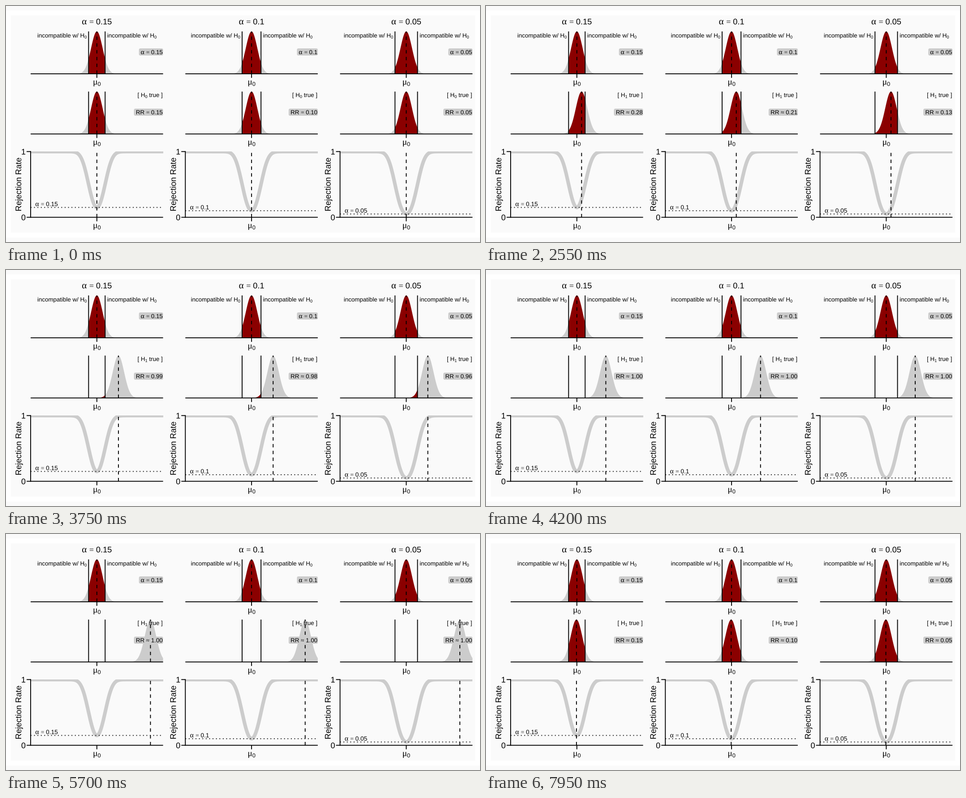
A matplotlib script that plays this animation: 1058x529 px, repeating every 8000 ms.

```python
import math

import matplotlib.pyplot as plt
import numpy as np
from matplotlib.animation import FuncAnimation
from matplotlib.collections import LineCollection
from matplotlib.patches import FancyBboxPatch, PathPatch, Rectangle
from matplotlib.path import Path
from matplotlib.textpath import TextPath
from matplotlib.transforms import Affine2D

W, H, DPI = 1058, 529, 100
PT = 72 / DPI
FRAMES, STEP_MS = 160, 50
CYCLE, HOLD = 130, 20           # frames per sweep, frames resting on the null

PANEL_DX = 345.3
LEFT, MID, RIGHT = 55, 202.8, 350.6
SIGMA = 12.82
TOP_BASE, LOW_BASE, PEAK = 152, 286.8, 95
RATE_ZERO, RATE_ONE = 473.6, 326.3
LINE = 1.9
SOLID, DASHED, DOTTED = "-", (0, (4, 4)), (0, (1, 3))
SMALL, BIG = 13.33, 18.2
GREY, RED, PAPER = "#cccccc", "#8b0000", "#fafafa"
LEVELS = [(0.15, 1.43953), (0.10, 1.64485), (0.05, 1.95996)]

# advance in em and size factor of the symbol glyphs
SYMBOLS = {"α": (0.631, 1.15), "μ": (0.576, 1.08), "=": (0.549, 1), "≈": (0.549, 1)}

fig = plt.figure(figsize=(W / DPI, H / DPI), dpi=DPI, facecolor=PAPER)
ax = fig.add_axes([0, 0, 1, 1])
ax.set_xlim(0, W)
ax.set_ylim(H, 0)
ax.axis("off")

glyph_cache, label_cache = {}, {}
static_text = []
static_lines = {SOLID: [], DASHED: [], DOTTED: []}


def glyphs(text, size, family="Liberation Sans"):
    key = text, size, family
    if key not in glyph_cache:
        path = TextPath((0, 0), text, size=size, prop={"family": family})
        glyph_cache[key] = Path(path.vertices, path.codes)
    return glyph_cache[key]


def advance(text, size):
    def reach(s):
        return glyphs(s, size).vertices[:, 0].max()
    return reach(text + "|") - reach("|")


def label_path(parts, size):
    """Set a row of parts: symbols, '_x' subscripts and plain text."""
    key = tuple(parts), size
    if key in label_cache:
        return label_cache[key]
    pen, paths = 0, []
    for part in parts:
        drop = 0
        if part in SYMBOLS:
            em, factor = SYMBOLS[part]
            pad = 0.278 * size if part in "=≈" else 0
            path, step = glyphs(part, size * factor, "Liberation Serif"), em * size + pad
            pen += pad
        elif part[0] == "_":
            sub = 0.7 * size
            path, step = glyphs(part[1:], sub), advance(part[1:], sub)
            drop = -0.17 * size
        else:
            path, step = glyphs(part, size), advance(part, size)
        paths.append(path.transformed(Affine2D().translate(pen, drop)))
        pen += step
    label_cache[key] = Path.make_compound_path(*paths), pen
    return label_cache[key]


def placed(parts, x, y, size=SMALL, align=0.0, turn=0):
    """Text outline with its baseline at y; align 0, 0.5, 1 is left, centre, right."""
    path, width = label_path(parts, size)
    move = Affine2D().translate(-align * width, 0).scale(1, -1)
    return path.transformed(move.rotate_deg(turn).translate(x, y)), width


def add_path(path, color="black", z=6):
    patch = PathPatch(path, facecolor=color, edgecolor="none", linewidth=0, zorder=z)
    return ax.add_artist(patch)


def write(*args, **kwargs):
    path, width = placed(*args, **kwargs)
    static_text.append(path)
    return width


def line(x0, y0, x1, y1, style=SOLID):
    static_lines[style].append([(x0, y0), (x1, y1)])


def moving_line(x, y0, y1):
    art, = ax.plot([x, x], [y0, y1], color="black", lw=LINE * PT, linestyle=DASHED,
                   dash_capstyle="butt", snap=False, zorder=4)
    return art


def badge(x0, y0, x1, y1):
    r = 3.5
    ax.add_artist(FancyBboxPatch((x0 + r, y0 + r), x1 - x0 - 2 * r, y1 - y0 - 2 * r,
                                 boxstyle=f"round,pad={r}", facecolor=GREY,
                                 edgecolor="none", linewidth=0, zorder=5))


def cdf(z):
    return 0.5 * (1 + np.vectorize(math.erf)(np.asarray(z) / math.sqrt(2)))


def rejection(delta, z):
    return cdf(delta - z) + cdf(-delta - z)


def bell(x0, x1, centre, base):
    x = np.linspace(x0, x1, 80)
    y = base - PEAK * np.exp(-0.5 * ((x - centre) / SIGMA) ** 2)
    return Path(np.column_stack([np.r_[x0, x, x1], np.r_[base, y, base]]))


def bell_pair(dx, cut, centre, base):
    mid = MID + dx
    lo = max(centre - 4 * SIGMA, LEFT + dx)
    hi = min(centre + 4 * SIGMA, RIGHT + dx)
    return bell(lo, hi, centre, base), bell(mid - cut, mid + cut, centre, base)


class Panel:
    def __init__(self, index, alpha, z):
        self.dx, self.z, self.cut = index * PANEL_DX, z, z * SIGMA
        self.mid, self.right = MID + self.dx, RIGHT + self.dx
        self.value = ["α", "=", f"{alpha:g}"]
        write(self.value, self.mid, 41.2, BIG, 0.5)
        for base in (TOP_BASE, LOW_BASE):
            self.draw_axis(base)
        self.draw_top()
        self.draw_rate(alpha)

        tail, core = bell_pair(self.dx, self.cut, self.mid, LOW_BASE)
        self.tail = add_path(tail, GREY, 2)
        self.core = add_path(core, RED, 3)
        self.mean = moving_line(self.mid, LOW_BASE, LOW_BASE - PEAK)
        self.marker = moving_line(self.mid, RATE_ZERO, RATE_ONE)
        badge(self.right - 65, 230, self.right, 246)
        self.labels = add_path(Path(np.zeros((1, 2))))

    def draw_axis(self, base):
        line(LEFT + self.dx, base, self.right, base)
        line(self.mid, base, self.mid, base + 9)
        write(["μ", "_0"], self.mid, base + 24, BIG, 0.5)
        if base != RATE_ZERO:
            for x in (self.mid - self.cut, self.mid + self.cut):
                line(x, base, x, base - PEAK)

    def draw_top(self):
        tail, core = bell_pair(self.dx, self.cut, self.mid, TOP_BASE)
        add_path(tail, GREY, 2)
        add_path(core, RED, 3)
        line(self.mid, TOP_BASE, self.mid, TOP_BASE - PEAK, DASHED)
        note = ["incompatible w/ H", "_0"]
        write(note, self.mid - self.cut - 4, 70.6, align=1)
        write(note, self.mid + self.cut + 4.6, 70.6)
        width = write(self.value, self.right - 0.8, 108, align=1)
        badge(self.right - width - 4.8, 95, self.right, 111)

    def draw_rate(self, alpha):
        x0 = LEFT + self.dx
        height = RATE_ZERO - RATE_ONE
        x = np.linspace(x0 - 5, self.right + 5, 200)
        y = RATE_ZERO - height * rejection((x - self.mid) / SIGMA, self.z)
        curve, = ax.plot(x, y, color=GREY, lw=8 * PT, zorder=2)
        curve.set_clip_path(Rectangle((x0, RATE_ONE), RIGHT - LEFT, height,
                                      transform=ax.transData))
        self.draw_axis(RATE_ZERO)
        line(x0, RATE_ZERO + 1, x0, RATE_ONE - 1)
        for y, digit in ((RATE_ONE, "1"), (RATE_ZERO, "0")):
            line(x0 - 9, y, x0, y)
            write([digit], x0 - 11, y + 6.6, BIG, 1)
        write(["Rejection Rate"], x0 - 21, (RATE_ZERO + RATE_ONE) / 2,
              18.4, 0.5, turn=-90)
        level = RATE_ZERO - height * alpha
        line(x0, level, self.right, level, DOTTED)
        write(self.value, x0 + 10.3, level - 3, 13.7)

    def update(self, shift, null):
        centre = self.mid + shift
        tail, core = bell_pair(self.dx, self.cut, centre, LOW_BASE)
        self.tail.set_path(tail)
        self.core.set_path(core)
        for art in (self.mean, self.marker):
            art.set_xdata([centre, centre])
        edge = self.right - 0.8
        truth = ["[ H", "_0" if null else "_1", " true ]"]
        value = float(rejection(shift / SIGMA, self.z))
        rate = ["RR", "=" if null else "≈", f"{value:.2f}"]
        rows = [placed(truth, edge, 204, align=1)[0], placed(rate, edge, 242.8, align=1)[0]]
        self.labels.set_path(Path.make_compound_path(*rows))


def mean_shift(step):
    """Gentle start, then a steady run to the edge."""
    return max(0.01097 * step ** 2, 1.833 * (step - 28.73))


def update(i):
    step = max(0, i % CYCLE - HOLD)
    side = 1 if i < CYCLE else -1
    shift = side * mean_shift(step) if step else 0
    for panel in panels:
        panel.update(shift, step == 0)
    return []


for box, color in (((0, 10, W, 508.5), "white"), ((11, 21, 1036, 487), PAPER)):
    ax.add_artist(Rectangle(box[:2], *box[2:], facecolor=color, linewidth=0, zorder=0))

panels = [Panel(i, *level) for i, level in enumerate(LEVELS)]
add_path(Path.make_compound_path(*static_text))
for style, segments in static_lines.items():
    ax.add_artist(LineCollection(segments, colors="black", linewidths=LINE * PT,
                                 linestyles=[style], capstyle="butt", snap=False,
                                 zorder=4))

anim = FuncAnimation(fig, update, frames=FRAMES, interval=STEP_MS,
                     repeat=True, repeat_delay=0, blit=False)
plt.show()
```
